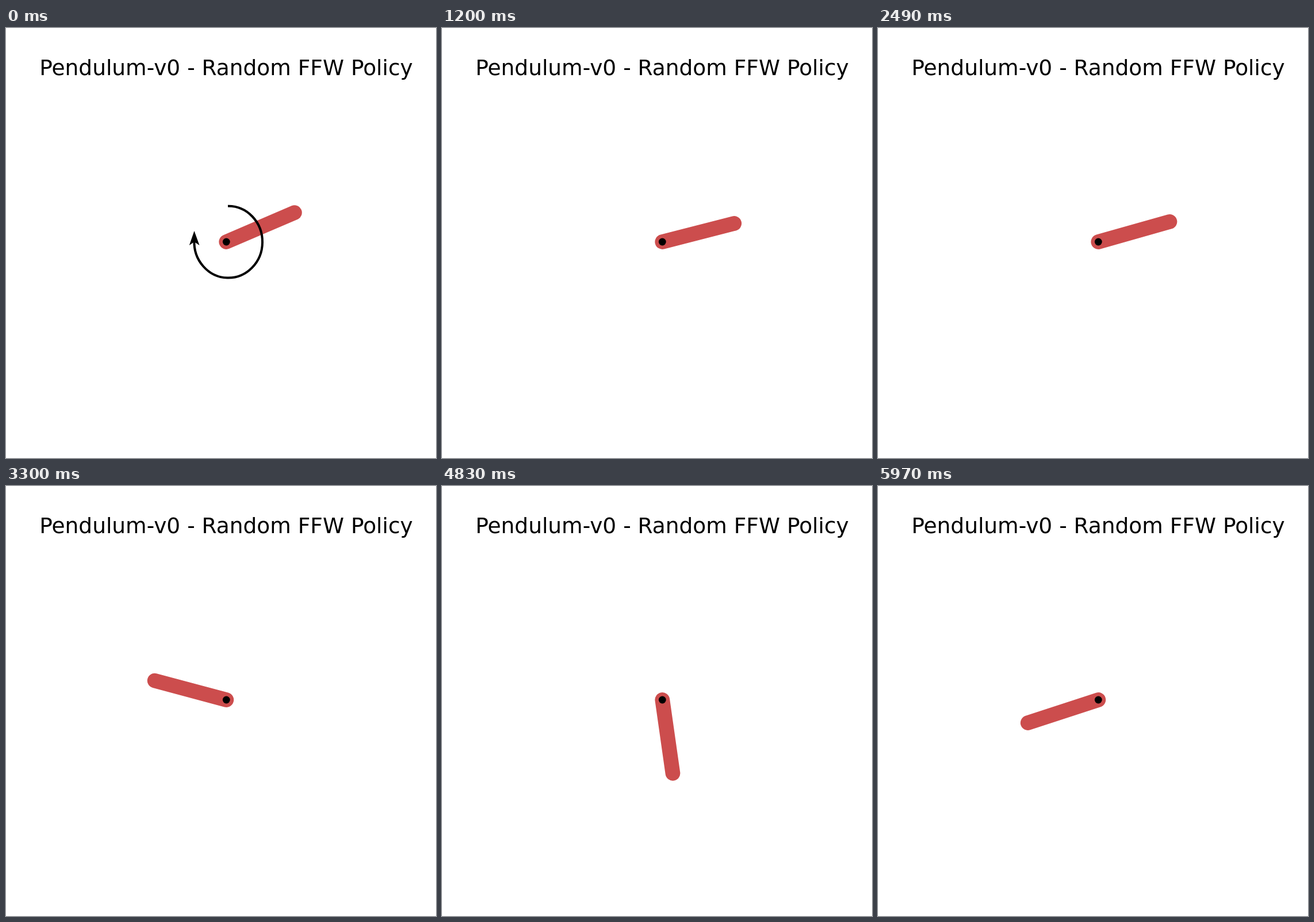
Recreate the animation shown at these times as an HTML page. Size 748 by 748 pixels, loop 6000 ms.

```html
<!DOCTYPE html>
<html lang="en">
<head>
<meta charset="utf-8">
<title>Pendulum</title>
<style>
  html, body { margin: 0; width: 100%; height: 100%; overflow: hidden; background: #fff; }
  svg { display: block; width: 100vw; height: 100vh; }
  text { font: 37.5px "DejaVu Sans", sans-serif; text-anchor: middle; }
</style>
</head>
<body>
<svg viewBox="0 0 748 748">
  <text x="383" y="82.3">Pendulum-v0 - Random FFW Policy</text>
  <line id="rod" x1="383.3" y1="372" stroke="#cc4d4d" stroke-width="25.8" stroke-linecap="round"/>
  <circle cx="383.3" cy="372" r="6.4"/>
  <g id="torque">
    <path d="M386 309.8A59.3 62.4 0 1 1 327.5 369" fill="none" stroke="#000" stroke-width="4"/>
    <path d="M327.5 353L336.5 378L327.5 372L318.8 378Z"/>
  </g>
</svg>
<script>
const STEP_MS = 30, STEPS = 200;
const PIVOT = { x: 383.3, y: 372 }, LENGTH = 129;
const rod = document.getElementById('rod');
const torque = document.getElementById('torque');

// Free swing, semi-implicit Euler; angles are measured from straight down.
function simulate(angle, speed) {
  const dt = 0.05, gravity = 15;
  return Array.from({ length: STEPS }, () => {
    const current = angle;
    speed -= gravity * Math.sin(angle) * dt;
    angle += speed * dt;
    return current;
  });
}

const angles = simulate(1.9757, 0.503);

function draw(ms) {
  const step = Math.floor(ms / STEP_MS) % STEPS;
  const angle = angles[step];
  rod.setAttribute('x2', PIVOT.x + LENGTH * Math.sin(angle));
  rod.setAttribute('y2', PIVOT.y + LENGTH * Math.cos(angle));
  torque.style.display = step === 0 ? '' : 'none';
}

const start = performance.now();
function tick() {
  draw(performance.now() - start);
  requestAnimationFrame(tick);
}
draw(0);
requestAnimationFrame(tick);
</script>
</body>
</html>
```
